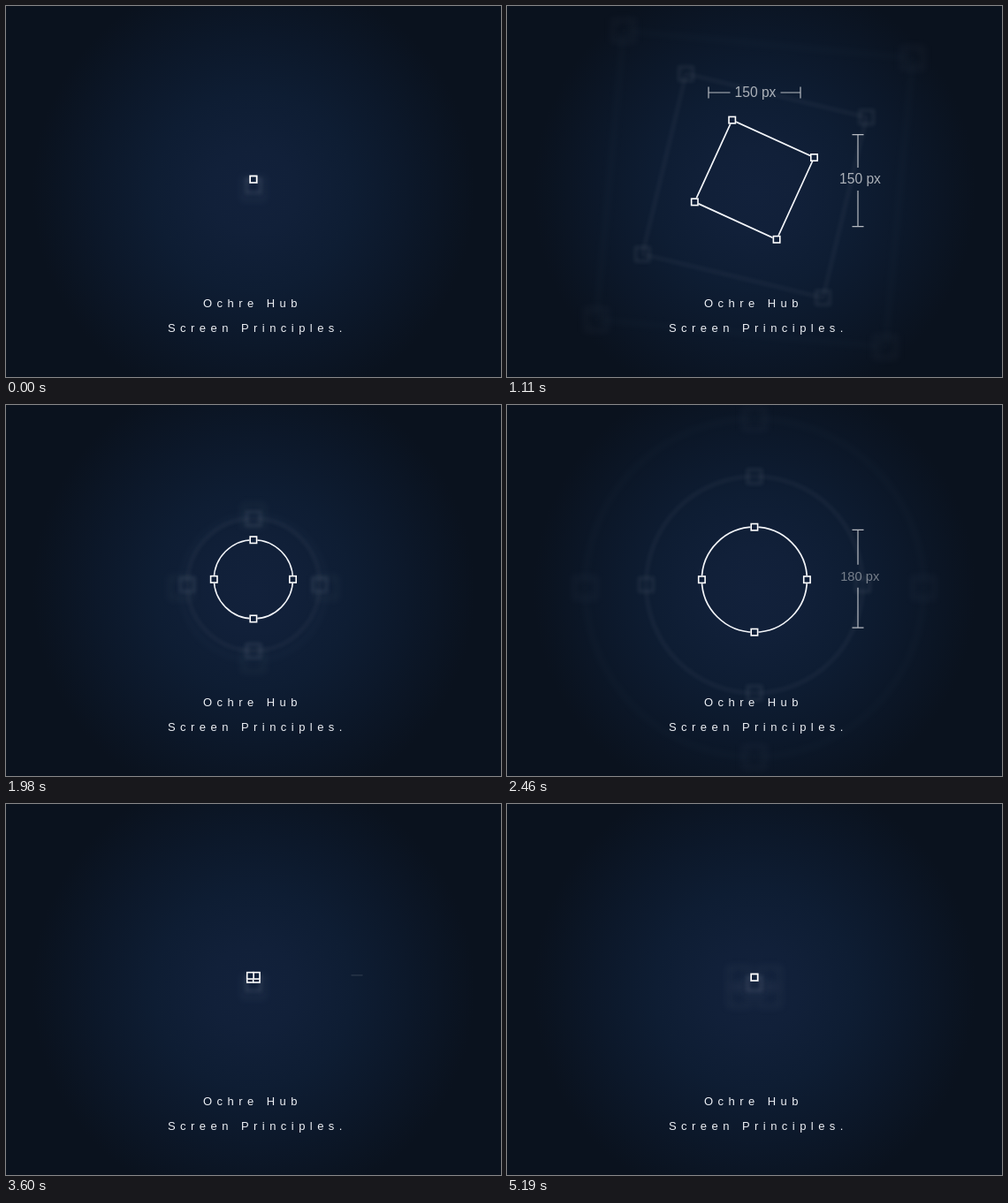
These frames come from a looping animation (560 px wide and 420 px high, 5220 ms). An HTML page with a canvas:

```html
<!DOCTYPE html>
<html lang="en">
<head>
<meta charset="utf-8">
<title>Ochre Hub</title>
<style>
html, body { margin: 0; width: 100%; height: 100%; overflow: hidden; background: #0a121e; }
canvas { position: absolute; left: 0; top: 0; width: 560px; height: 420px; }
.line {
  position: absolute; white-space: pre; color: #eef1f6;
  font: 13px/16px "Liberation Sans", Arial, sans-serif; letter-spacing: 5.45px;
}
</style>
</head>
<body>
<canvas id="stage" width="560" height="420"></canvas>
<div class="line" style="left:223px;top:329px">Ochre Hub</div>
<div class="line" style="left:183px;top:357px">Screen Principles.</div>
<script>
const LOOP = 5220, LAG = 50, CX = 280, CY = 197;
const ctx = document.getElementById('stage').getContext('2d');

// Times are relative to each shape's start
const shapes = [
  { start: 5, w: 102, h: 102, spin: true, shrink: 1230, fontSize: 15.6, tagIn: 350, tagOut: 1380,
    tags: [{ text: '150 px', size: 104, x: 280, y: 98, tx: 281, ty: 98 },
           { text: '150 px', size: 104, x: 397, y: 197.7, tx: 399.5, ty: 196, up: true }] },
  { start: 1796, w: 119, h: 119, spin: true, round: true, shrink: 1230, fontSize: 14.7, tagIn: 370, tagOut: 1380,
    tags: [{ text: '180 px', size: 119, x: 397, y: 197, tx: 399.2, ty: 193.8, up: true }] },
  { start: 3593, w: 147, h: 83, shrink: 1108, fontSize: 14.7, tagIn: 320, tagOut: 1108,
    tags: [{ text: '210 px', size: 147, x: 280, y: 118, tx: 280.2, ty: 118 },
           { text: '130 px', size: 84, x: 397, y: 196.5, tx: 399.2, ty: 195.5, up: true }] }
];

const clamp = v => Math.max(0, Math.min(1, v));
const span = (t, from, dur) => clamp((t - from) / dur);
const easeOut = u => 1 - (1 - u) ** 3;
const easeIn = u => u ** 3;
const easeBoth = u => (1 - Math.cos(Math.PI * u)) / 2;
const mod = t => ((t % LOOP) + LOOP) % LOOP;
const since = (s, t) => mod(t - s.start);

function pose(t) {
  const s = shapes.reduce((a, b) => since(b, t) < since(a, t) ? b : a);
  const r = since(s, t);
  return {
    s,
    grow: easeOut(span(r, 0, 500)) * (1 - easeIn(span(r, s.shrink, 400))),
    angle: s.spin ? Math.PI / 2 * easeBoth(span(r, 924, 520)) : 0
  };
}

// Listed from the bottom up, so that upper handles cover lower ones
function corners({ s, grow, angle }, k) {
  const a = s.w / 2 * grow * k, b = s.h / 2 * grow * k;
  const base = s.round ? [[0, a], [a, 0], [-a, 0], [0, -a]] : [[-a, b], [a, b], [a, -b], [-a, -b]];
  const c = Math.cos(angle), n = Math.sin(angle);
  return base.map(([x, y]) => [x * c - y * n, x * n + y * c]);
}

function outline(p, pts, k) {
  ctx.beginPath();
  if (p.s.round) ctx.arc(0, 0, p.s.w / 2 * p.grow * k, 0, 7);
  else {
    pts.forEach(([x, y]) => ctx.lineTo(x, y));
    ctx.closePath();
  }
  ctx.stroke();
}

function echo(t, k, dy, alpha, blur) {
  const p = pose(t), pts = corners(p, k), h = 3.7 * k;
  ctx.save();
  ctx.translate(CX, CY + dy);
  ctx.filter = `blur(${blur}px)`;
  ctx.strokeStyle = '#c3cbd8';
  ctx.lineWidth = 1.6 * k;
  ctx.globalAlpha = alpha;
  if (p.grow > 0.01) outline(p, pts, k);
  ctx.globalAlpha = alpha * (1.8 - 0.5 * p.grow);
  ctx.beginPath();
  pts.forEach(([x, y]) => ctx.rect(x - h, y - h, 2 * h, 2 * h));
  ctx.stroke();
  ctx.restore();
}

function mainShape(t) {
  const p = pose(t), pts = corners(p, 1), h = 3.7;
  ctx.save();
  ctx.translate(CX - 0.1, CY - 0.7 + (p.s.round ? 1.4 : 0.4) * p.grow);
  ctx.strokeStyle = '#f3f5f9';
  ctx.fillStyle = '#10203a';
  ctx.lineWidth = 0.9 + 0.8 * p.grow;
  if (p.grow > 0.005) outline(p, pts, 1);
  ctx.strokeStyle = '#fff';
  ctx.lineWidth = 1.6;
  pts.forEach(([x, y]) => {
    ctx.fillRect(x - h - 0.8, y - h - 0.8, 2 * h + 1.6, 2 * h + 1.6);
    ctx.strokeRect(x - h, y - h, 2 * h, 2 * h);
  });
  ctx.restore();
}

function bracket(g, p) {
  const gap = g.up ? 13 : 28.5;
  const mid = g.up ? g.ty : g.tx;
  const c = mid + ((g.up ? g.y : g.x) - mid) * p;
  const line = (a, b, u, v) => {
    if (g.up) { ctx.moveTo(g.x + u, a); ctx.lineTo(g.x + v, b); }
    else { ctx.moveTo(a, g.y + u); ctx.lineTo(b, g.y + v); }
  };
  ctx.beginPath();
  for (const side of [-1, 1]) {
    const end = c + side * g.size / 2 * p;
    const inner = mid + side * gap;
    line(end, end, -6.5, 6.5);
    if ((end - inner) * side > 0) line(inner, end, 0, 0);
  }
  ctx.stroke();
}

function labels(s, t) {
  const r = since(s, t);
  const p = easeOut(span(r, s.tagIn, 500)) * (1 - easeIn(span(r, s.tagOut, 420)));
  const bar = 0.7 * span(r, s.tagIn, 100) * (1 - span(r, s.tagOut + 360, 80));
  const ink = 0.65 * span(r, 300, 550) * (1 - span(r, s.tagOut, 250));
  ctx.save();
  ctx.strokeStyle = ctx.fillStyle = '#fff';
  ctx.lineWidth = 1.2;
  ctx.font = `${s.fontSize}px "Liberation Sans", Arial, sans-serif`;
  ctx.textAlign = 'center';
  for (const g of s.tags) {
    ctx.globalAlpha = bar;
    if (bar > 0) bracket(g, p);
    ctx.globalAlpha = ink;
    if (ink > 0) ctx.fillText(g.text, g.tx, g.ty + 5.3);
  }
  ctx.restore();
}

const glow = ctx.createRadialGradient(280, 210, 0, 280, 210, 250);
[[0, '#12213b'], [0.2, '#112039'], [0.45, '#0e1d33'], [0.7, '#0c182a'], [1, '#0a121e']]
  .forEach(([at, color]) => glow.addColorStop(at, color));

function draw(t) {
  ctx.fillStyle = glow;
  ctx.fillRect(0, 0, 560, 420);
  echo(t - 2 * LAG, 3.22, 10, 0.032, 4);
  echo(t - LAG, 2.06, 6.5, 0.075, 2);
  shapes.forEach(s => labels(s, t));
  mainShape(t);
}

const begin = performance.now();
function tick() {
  draw((performance.now() - begin) % LOOP);
  requestAnimationFrame(tick);
}
tick();
</script>
</body>
</html>
```
